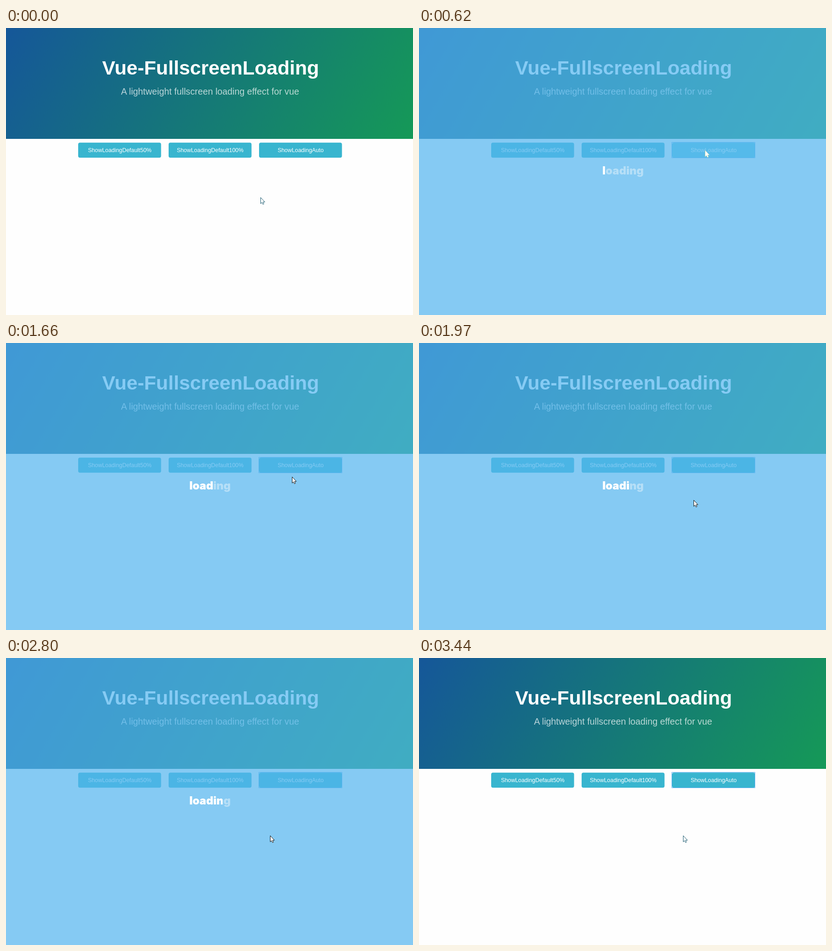
These frames come from a looping animation (891 px wide and 629 px high, 3830 ms). An HTML page:

```html
<!DOCTYPE html>
<html lang="en">
<head>
<meta charset="utf-8">
<title>Vue-FullscreenLoading</title>
<style>
  html, body { margin: 0; width: 100%; height: 100%; overflow: hidden; background: #fefefe; }
  header { position: absolute; top: 0; left: 0; width: 891px; height: 243px; background: linear-gradient(120deg, #155799, #159957); }
  svg { position: absolute; top: 0; left: 0; display: block; }
  text { fill: #fff; font-family: "Liberation Sans", Arial, sans-serif; }
  .title { font-size: 43.1px; font-weight: 700; }
  .tagline { font-size: 19.8px; opacity: .7; }
  .button rect { fill: #38b5cf; }
  .button text { font-size: 12.4px; text-anchor: middle; }
  .button.hover rect { fill: #5bc8de; }
  #focus { fill: none; stroke: #5fb0f0; }
  #veil { fill: #53b6ef; opacity: .7; }
  .word { font: 900 24px Inter, "Arial Black", sans-serif; font-optical-sizing: none; text-anchor: middle; }
  .pale { opacity: .4; }
  #pointer path { fill: #fff; stroke-linejoin: round; }
  #arrow { stroke: #1b5a70; }
  #arrow.dark { stroke: #111; }
  #arrow.faint { stroke: #d9dc9a; stroke-width: .6; }
  #hand { stroke: #111; }
  #click { fill: #fff000; opacity: .5; }
  .off { display: none; }
</style>
</head>
<body>
<header></header>
<svg width="891" height="629" viewBox="0 0 891 629">
  <defs>
    <clipPath id="lit"><rect id="fill" x="398" y="295" width="0" height="40"/></clipPath>
  </defs>

  <text class="title" x="210.5" y="102">Vue-FullscreenLoading</text>
  <text class="tagline" x="251.7" y="146">A lightweight fullscreen loading effect for vue</text>

  <g class="button">
    <rect x="158" y="251.3" width="181.5" height="33" rx="4"/>
    <text x="249" y="272">ShowLoadingDefault50%</text>
  </g>
  <g class="button">
    <rect x="356" y="251.3" width="181.5" height="33" rx="4"/>
    <text x="447" y="272">ShowLoadingDefault100%</text>
  </g>
  <g class="button" id="auto">
    <rect x="554" y="251.3" width="181.5" height="33" rx="4"/>
    <text x="645" y="272">ShowLoadingAuto</text>
  </g>
  <rect id="focus" x="553.5" y="250.5" width="182" height="34"/>

  <g id="loader">
    <rect id="veil" width="891" height="629"/>
    <text class="word pale" x="446.7" y="320.5">loading</text>
    <g clip-path="url(#lit)"><text class="word" x="446.7" y="320.5">loading</text></g>
  </g>

  <g id="pointer">
    <path id="arrow" d="M.5 .5V14L3.4 11.2 5.4 15.5 7.6 14.6 5.7 10.3H9.7Z"/>
    <path id="hand" d="M-1.5 1.2Q-1.5-.3 0-.3T1.5 1.2V6Q4 5 4.5 6.8 7 6 7.2 7.8 9.3 7.4 9.3 9.4V12.5Q9.3 15 7.8 16.5V18.5H-.2V17Q-2.5 14.5-5 10.5-5.2 8.3-3.3 9L-1.5 11Z"/>
    <circle id="click" r="10"/>
  </g>
</svg>

<script>
  const LOOP = 3830;
  const SHOW = 620, HIDE = 3440, PRESS = 460;

  // Bursts of screen updates: first time, last time, count
  const bursts = [
    [70, 540, 7], [620, 1090, 7], [1170, 1660, 7], [1730, 2180, 7],
    [2270, 2730, 7], [2800, 2980, 3], [3120, 3440, 5]
  ];
  const ticks = [0];
  for (const [from, to, n] of bursts) {
    for (let i = 0; i < n; i++) ticks.push(from + (to - from) * i / (n - 1));
  }

  // Keys are [time, ...values]
  const cursorKeys = [
    [0, 557, 371], [390, 626, 268], [1090, 626, 268],
    [1660, 626, 293], [1730, 624, 299], [2180, 578, 389]
  ];
  const fillKeys = [
    [620, 407], [1090, 431], [1660, 454], [2180, 465.5],
    [2730, 473], [2980, 476], [3040, 476], [3350, 491.5]
  ];

  const $ = id => document.getElementById(id);
  const show = (id, on) => $(id).classList.toggle("off", !on);

  function sample(keys, t) {
    const next = keys.findIndex(k => k[0] > t);
    if (next === 0) return keys[0].slice(1);
    if (next < 0) return keys[keys.length - 1].slice(1);
    const a = keys[next - 1], b = keys[next];
    const p = (t - a[0]) / (b[0] - a[0]);
    return a.slice(1).map((v, i) => v + (b[i + 1] - v) * p);
  }

  function draw(now) {
    const time = now % LOOP;
    const t = ticks.filter(v => v <= time).pop();
    const [x, y] = sample(cursorKeys, t);
    const [front] = sample(fillKeys, t);
    const loading = t >= SHOW && t < HIDE;
    const over = t < SHOW && y < 284;
    const first = t === SHOW;

    $("pointer").setAttribute("transform", `translate(${Math.round(x)} ${Math.round(y)})`);
    $("fill").setAttribute("width", front - 398);
    $("auto").classList.toggle("hover", over || first);
    $("arrow").classList.toggle("dark", loading && !first);
    $("arrow").classList.toggle("faint", first);
    show("arrow", !over);
    show("hand", over);
    show("click", t >= PRESS && t < SHOW);
    show("focus", t >= PRESS);
    show("loader", loading);
  }

  const start = performance.now();
  function frame() {
    draw(performance.now() - start);
    requestAnimationFrame(frame);
  }
  frame();
</script>
</body>
</html>
```
